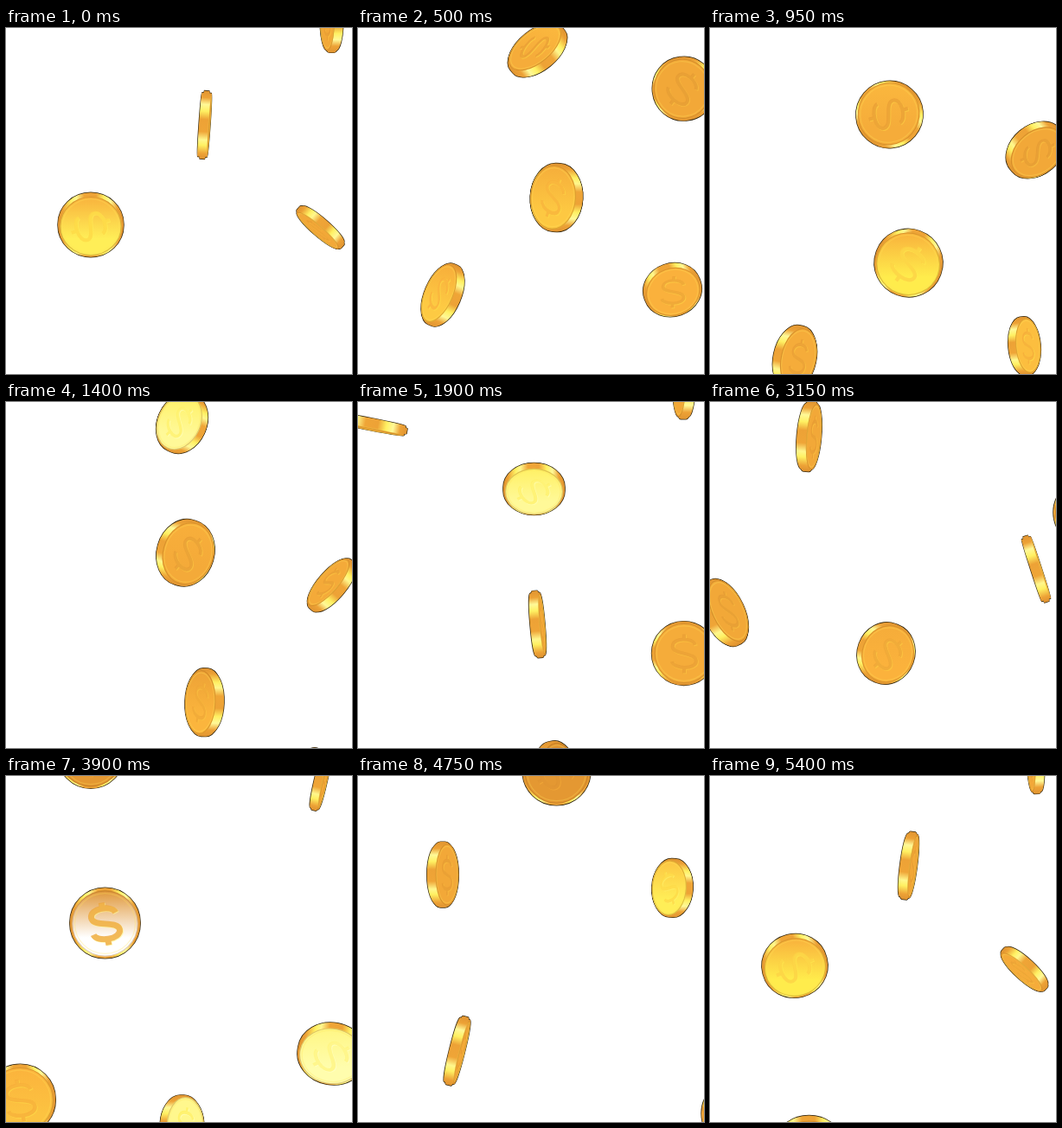
An HTML page with a canvas for the animation above (5.45 s loop, 400 px wide and 400 px high).

```html
<!DOCTYPE html>
<html lang="en">
<head>
<meta charset="utf-8">
<title>Falling coins</title>
<style>
  html, body { margin: 0; width: 100%; height: 100%; overflow: hidden; background: #fff; }
  canvas { display: block; width: 400px; height: 400px; }
</style>
</head>
<body>
<canvas id="stage" width="400" height="400"></canvas>
<script>
const ctx = document.getElementById('stage').getContext('2d');
const LOOP = 5450, STEP = 50;
const HALF_SPIN = 2 * Math.PI / LOOP; // two turns per loop, as a quaternion half angle
const RAD = Math.PI / 180;
const RAMP = [[222, 146, 48], [251, 178, 60], [255, 236, 76], [255, 255, 184], [255, 255, 255]];

const clamp = (v, lo, hi) => Math.min(hi, Math.max(lo, v));
const mix = (a, b, u) => a + (b - a) * u;

function tone(s) {
  s = clamp(s, 0, 4);
  const i = Math.min(3, Math.floor(s));
  return `rgb(${RAMP[i].map((c, k) => Math.round(mix(c, RAMP[i + 1][k], s - i)))})`;
}

// Quaternions: [w, x, y, z]; x right, y down, z towards the viewer.
function mul([a, b, c, d], [w, x, y, z]) {
  return [a * w - b * x - c * y - d * z, a * x + b * w + c * z - d * y,
          a * y - b * z + c * w + d * x, a * z + b * y - c * x + d * w];
}
const dot = (p, q) => p.reduce((sum, v, i) => sum + v * q[i], 0);
const turn = (q, v) => mul(mul(q, [0, ...v]), [q[0], -q[1], -q[2], -q[3]]).slice(1);

function orient(az, tilt, roll) {
  const s = Math.sin(tilt * RAD / 2), c = Math.cos(tilt * RAD / 2);
  const lean = [c, -Math.sin(az * RAD) * s, Math.cos(az * RAD) * s, 0];
  return mul(lean, [Math.cos(roll * RAD / 2), 0, 0, Math.sin(roll * RAD / 2)]);
}

function slerp(p, q, u) {
  const w = Math.acos(clamp(dot(p, q), -1, 1));
  if (w < 1e-4) return p;
  const a = Math.sin((1 - u) * w) / Math.sin(w), b = Math.sin(u * w) / Math.sin(w);
  return p.map((v, i) => a * v + b * q[i]);
}

// Both faces look alike, so take the side that suits the spin rate.
function nearest(prev, q, dt) {
  const miss = c => Math.abs(Math.acos(Math.min(1, Math.abs(dot(prev, c)))) - dt * HALF_SPIN);
  const back = mul(q, [0, 0, 1, 0]);
  const best = miss(back) < miss(q) ? back : q;
  return dot(prev, best) < 0 ? best.map(v => -v) : best;
}

const coins = [];

// Each pose: time, tilt direction, tilt, roll, shade at top, shade at bottom.
function coin(x, y, at, speed, ...poses) {
  const keys = poses.map(([t, az, tilt, roll = 0, top = 0.7, low = top]) =>
    ({ t, q: orient(az, tilt, roll), top, low }));
  for (let i = 1; i < keys.length; i++) {
    keys[i].q = nearest(keys[i - 1].q, keys[i].q, keys[i].t - keys[i - 1].t);
  }
  coins.push({ x, y, at, speed, r: speed * 4.69, keys });
}

coin(98, 227.5, 5450, 8.1, [3900, 90, 10, 0, 0.2], [4750, 0, 68],
  [5450, 90, 17, 70, 0.9, 2.1], [6400, 12, 55, 10, 0.8]);
coin(229.5, 112, 5450, 8.4, [4750, 90, 8, 60, 0.2], [5450, 4, 88.5],
  [6400, 110, 12, 35, 0.9, 2], [7350, -10, 55, 0, 0]);
coin(363.5, 230.5, 5450, 7.22, [3900, 13, 85], [4750, 183, 51, -25, 1.3, 2.1],
  [5450, 131, 79], [6400, -5, 63, 0, 1.2]);
coin(376.5, 141, 6400, 7.87, [5450, 180, 76], [6400, 50, 44, 70, 0.7], [7350, 0, 5, 0, 0.8]);
coin(207.5, 100, 950, 8.26, [950, 220, 12, 75, 1.1, 0.8], [1900, -5, 85]);
coin(203.5, 100.5, 1900, 7.6, [1900, 90, 37, 60, 2.2, 2.7], [3150, 20, 26, 50, 0.8, 1],
  [3900, 0, 50, 10, 2.6]);
coin(16.5, 26, 1900, 8.7, [1900, 101, 88], [3150, -25, 61], [3900, 90, 8, -10, 1, 1.3]);
coin(114.5, 170, 3900, 8.69, [3150, 5, 77], [3900, 90, 5, -10, 0, 4],
  [4750, 14, 85], [5400, 90, 25, 0, 0.7, 1]);
coin(377, 321, 3900, 8.53, [3150, -18, 89], [3900, 100, 31, 60, 2.5, 2.9]);
coin(435.5, 390, 4750, 8.2, [3900, 0, 85], [4750, 0, 8]);

function poseAt(keys, t) {
  let i = 0;
  while (i < keys.length - 2 && t > keys[i + 1].t) i++;
  const a = keys[i], b = keys[i + 1], u = (t - a.t) / (b.t - a.t), v = clamp(u, 0, 1);
  return { q: slerp(a.q, b.q, u), top: mix(a.top, b.top, v), low: mix(a.low, b.low, v) };
}

// Outline of a flat cylinder lying along the x axis.
function drum(d, a, r) {
  const p = new Path2D();
  p.ellipse(d, 0, a, r, 0, -Math.PI / 2, Math.PI / 2);
  p.ellipse(-d, 0, a, r, 0, Math.PI / 2, Math.PI * 1.5);
  p.closePath();
  return p;
}

const dollar = new Path2D('M.35-.26C.28-.5-.36-.5-.36-.22C-.36.06.38-.04.38.24' +
  'C.38.52-.32.5-.38.26M0-.6V-.42M0 .44V.62');

function drawCoin(c, y, t) {
  const { q, top, low } = poseAt(c.keys, t);
  const r = c.r, h = r * 0.14;
  let n = turn(q, [0, 0, 1]), ex = turn(q, [1, 0, 0]);
  const ey = turn(q, [0, 1, 0]);
  if (n[2] < 0) {
    n = n.map(v => -v);
    ex = ex.map(v => -v);
  }
  const az = Math.atan2(n[1], n[0]), d = h * Math.hypot(n[0], n[1]), a = r * n[2];

  ctx.setTransform(1, 0, 0, 1, c.x, y);
  ctx.rotate(az);
  const body = [drum(d * 0.55, a, r), drum(d, a * 0.94, r * 0.94)];
  ctx.strokeStyle = '#33270f';
  ctx.lineWidth = 1.4;
  body.forEach(p => ctx.stroke(p));

  const side = ctx.createLinearGradient(0, -r, 0, r);
  [0.1, 0.5, 2.7, 2.2, 0.5, 0.6, 2.6, 2.2, 0.5, 0].forEach((s, i) =>
    side.addColorStop([0, 0.1, 0.2, 0.3, 0.42, 0.6, 0.72, 0.8, 0.92, 1][i], tone(s)));
  ctx.fillStyle = side;
  body.forEach(p => ctx.fill(p));

  // Visible face, lit from top to bottom of the screen.
  const gx = Math.sin(az) * r, gy = Math.cos(az) * r;
  const light = ctx.createLinearGradient(d - gx * n[2], -gy, d + gx * 0.4 * n[2], gy * 0.4);
  light.addColorStop(0, tone(top));
  light.addColorStop(1, tone(low));
  const face = new Path2D();
  face.ellipse(d, 0, a * 0.94, r * 0.94, 0, 0, Math.PI * 2);
  ctx.fillStyle = light;
  ctx.fill(face);
  ctx.save();
  ctx.clip(face);
  ctx.strokeStyle = 'rgba(150, 88, 12, .3)';
  ctx.lineWidth = 2.4;
  ctx.stroke(face);
  ctx.restore();
  ctx.beginPath();
  ctx.ellipse(d, 0, a * 0.86, r * 0.86, 0, 0, Math.PI * 2);
  ctx.strokeStyle = 'rgba(255, 226, 90, .3)';
  ctx.lineWidth = 1.2;
  ctx.stroke();

  // Raised sign: a light edge, then the darker stroke.
  const mid = (top + low) / 2, ink = low - 0.45 - Math.max(0, low - 3) * 3;
  const stamp = (shift, shade, alpha) => {
    ctx.setTransform(ex[0] * r, ex[1] * r, ey[0] * r, ey[1] * r,
      c.x + n[0] * h + shift, y + n[1] * h + shift);
    ctx.globalAlpha = alpha;
    ctx.strokeStyle = tone(shade);
    ctx.stroke(dollar);
  };
  ctx.lineWidth = low > 3 ? 0.17 : 0.11;
  stamp(0.9, mid + 0.6, 0.6);
  stamp(0, ink, 0.75);
  ctx.globalAlpha = 1;
}

function render(now) {
  const time = Math.floor(now / STEP) * STEP % LOOP;
  ctx.setTransform(1, 0, 0, 1, 0, 0);
  ctx.fillStyle = '#fff';
  ctx.fillRect(0, 0, 400, 400);
  for (const c of coins) {
    for (const t of [time, time + LOOP]) {
      const y = c.y + (t - c.at) * c.speed / STEP;
      if (y > -50 && y < 450) drawCoin(c, y, t);
    }
  }
}

const start = performance.now();
function tick() {
  render(performance.now() - start);
  requestAnimationFrame(tick);
}
tick();
</script>
</body>
</html>
```
